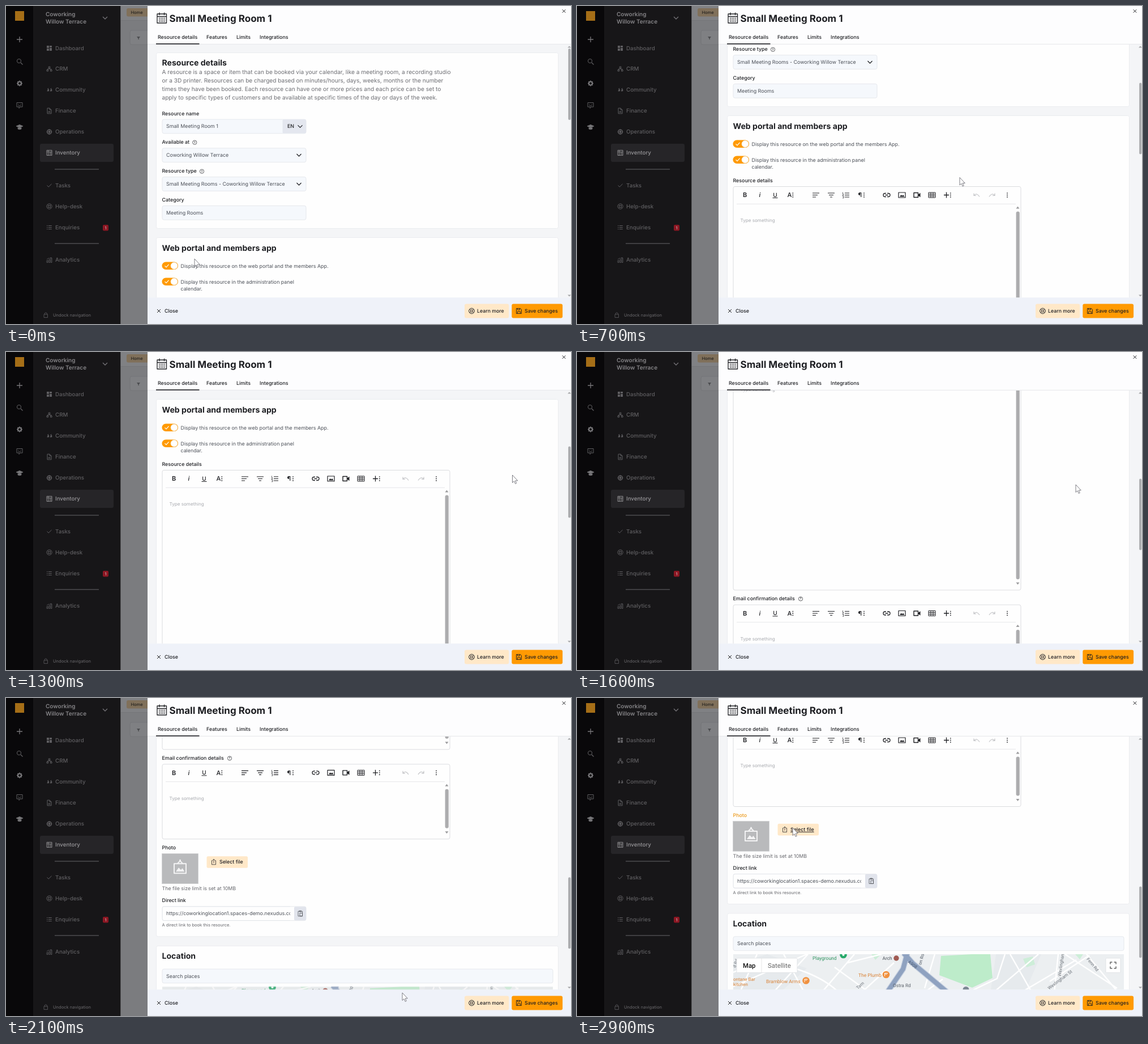
An HTML page for the animation above (3 s loop, 998 px wide and 561 px high).

```html
<!DOCTYPE html>
<html lang="en">
<head>
<meta charset="utf-8">
<title>Resource editor</title>
<style>
html, body { margin: 0; width: 100%; height: 100%; overflow: hidden; background: #fdfdfe; }
svg { display: block; width: 100vw; height: 100vh; font-family: Inter, sans-serif; font-optical-sizing: none; text-rendering: geometricPrecision; }
.map text { font-family: Roboto, sans-serif; }
</style>
</head>
<body>
<svg id="stage" viewBox="0 0 998 561"></svg>
<script>
const INK = '#1e1f23', SOFT = '#4c5058', DIM = '#5f5e61', AMBER = '#ff9a03', EDGE = '#e1e4e9';

const text = (x, y, s, size = 8.87, weight = 500, color = INK, extra = '') =>
  `<text x="${x}" y="${y}" dy=".355em" font-size="${size}" font-weight="${weight}" fill="${color}" ${extra}>${s}</text>`;
const heading = (y, s) => text(275.5, y, s, 14.1, 700);
const rect = (x, y, w, h, fill, r = 0, stroke = 'none', extra = '') =>
  `<rect x="${x}" y="${y}" width="${w}" height="${h}" rx="${r}" fill="${fill}" stroke="${stroke}" stroke-width=".8" ${extra}/>`;
const path = (d, stroke = INK, width = 1, fill = 'none', extra = '') =>
  `<path d="${d}" stroke="${stroke}" stroke-width="${width}" fill="${fill}" stroke-linejoin="round" ${extra}/>`;
const circle = (x, y, r, fill, stroke = 'none', width = 1) =>
  `<circle cx="${x}" cy="${y}" r="${r}" fill="${fill}" stroke="${stroke}" stroke-width="${width}"/>`;
const group = (x, y, body, extra = '') => `<g transform="translate(${x} ${y})" ${extra}>${body}</g>`;
const chevron = (x, y, color = INK, r = 4) => path(`M${x - r} ${y - r / 2}l${r} ${r} ${r} ${-r}`, color, 1.2);
const cross = (x, y, r) => path(`M${x - r} ${y - r}l${2 * r} ${2 * r}m0 ${-2 * r}l${-2 * r} ${2 * r}`);
const triangle = (x, y, h, color) => path(`M${x - 3} ${y + h}h6l-3 ${-2 * h}z`, 'none', 0, color);
const help = (x, y) => circle(x, y, 3.6, 'none', INK, .7) + text(x, y, '?', 5.5, 500, INK, 'text-anchor="middle"');
const buoy = (c, r = 4.6) => circle(0, 0, r, 'none', c) + circle(0, 0, 2, 'none', c) +
  path('M-3.2-3.2l1.8 1.8m2.8 2.8l1.8 1.8m0-6.4l-1.8 1.8m-2.8 2.8l-1.8 1.8', c);

function sidebar() {
  const icons = {
    Dashboard: rect(-4.5, -4.5, 4, 4, DIM) + rect(.5, -4.5, 4, 3, DIM) + rect(-4.5, .5, 4, 4, DIM) + rect(.5, -.5, 4, 5, DIM),
    CRM: path('M-1.3-4h2.6v2.4h-2.6zM-4.5 1.6h2.6V4h-2.6zM1.9 1.6h2.6V4H1.9zM0-1.6V0M-3.2 1.6V0h6.4v1.6', DIM),
    Community: path('M-3.9 2h3v-3h-2q0-1.6 1.6-2m2.6 5h3v-3h-2q0-1.6 1.6-2', DIM, .8, DIM),
    Finance: path('M-3.5-4.8h4l3 3v6.6h-7zM.5-4.8v3h3M-1.5 3V1M0 3v-2.6M1.5 3V1', DIM),
    Operations: circle(0, 0, 3.8, 'none', DIM, 1.5) + rect(-1.6, -1.6, 3.2, 3.2, DIM) + path('M0-5v10M-5 0h10', DIM, .7),
    Inventory: path('M-4.5-4.5h9v9h-9zM-4.5-1.8h9M-1.8-4.5v9M0 0h3.5M0 2.3h3.5', '#8c8b8d'),
    Tasks: path('M-4 0l2.7 2.7L4-2.6', DIM),
    'Help-desk': buoy(DIM),
    Enquiries: path('M-4.5-3h1.5M-4.5 0h1.5M-4.5 3h1.5M-1.7-3h6M-1.7 0h6M-1.7 3h6', DIM),
    Analytics: path('M-4.5 4.5V1h2v3.5zM-.8 4.5v-5h2v5zM2.7 4.5v-8h1.8v8zM-4.5-1l3-2 2 .4 3-2', DIM, .8)
  };
  const rows = [74.5, 111, 148, 185, 222, 259, 316.5, 353.5, 390.5, 448];
  let out = rect(0, 0, 48, 561, '#09080a') + rect(48, 0, 154.3, 561, '#171618') + rect(60, 243, 130, 32, '#262528', 3);
  Object.keys(icons).forEach((name, i) => {
    out += group(76.5, rows[i], icons[name]) + text(87, rows[i], name, 9.72, 500, i == 5 ? '#98979a' : DIM);
  });
  const rail = '#777679';
  return out + rect(16, 9, 16, 17, '#a56e17') +
    path('M24 54v10M19 59h10', rail, 1.3) +
    circle(23, 97, 3.6, 'none', DIM) + path('M26 100l3.5 3.5', DIM, 1.2) +
    circle(24, 136.5, 3, 'none', rail, 2.2) + path('M24 131.5v2m0 6v2m-5-5h2m6 0h2M20.5 133l1.3 1.3m4.4 4.4l1.3 1.3m0-7l-1.3 1.3m-4.4 4.4l-1.3 1.3', rail, 1.6) +
    path('M19 170.5h10v7.5h-4l-2 2.5V178h-4zM22 173v1m4-1v1M21.5 175.5q2.5 1.8 5 0', DIM) +
    path('M18 212l6-2.6 6 2.6-6 2.6zM21 214.5v2.5q3 1.5 6 0v-2.5', rail, .8, rail) +
    text(70, 14.5, 'Coworking', 10, 600, '#858487') + text(70, 27, 'Willow Terrace', 10, 600, '#858487') +
    chevron(175, 21, rail) + path('M86 288h78M86 419h78', '#67666a') +
    rect(171, 386, 10, 10.5, '#8c1723', 2) + text(176, 391.3, '1', 7, 500, '#c9b0b3', 'text-anchor="middle"') +
    path('M67 544h6.5v5.5h-6.5zM68.3 544v-2q2-2.5 4 0v2', DIM, .8) + text(83, 545.5, 'Undock navigation', 7.5, 500, DIM);
}

function backdrop() {
  return rect(202, 0, 48, 561, '#7b7c7f') + rect(202, 0, 48, 25, '#808184') + path('M203 25.5h47', '#747578') +
    rect(213, 4, 40, 14.5, '#80705a', 3) + text(220.5, 11, 'Home', 7.5, 500, '#242220') +
    rect(219, 43, 40, 25, '#7f8083', 3, '#727376') + path('M231 54h6l-2.3 3v2.5l-1.4-1v-1.5z', 'none', 0, '#4a4b4e');
}

function chrome() {
  return rect(250, 0, 748, 67, '#fdfdfe') + path('M250 67.3h748', '#e6e8eb') +
    path('M267 14h16.5v16H267zM267 18.5h16.5M271 11.5v4.5M279.5 11.5v4.5', INK, 1.3) +
    path('M270 21.5h11M270 24.3h11M270 27h11', INK, 1.3, 'none', 'stroke-dasharray="1.8 1.3"') +
    text(288.5, 21.5, 'Small Meeting Room 1', 17.05, 700) + cross(985.5, 9, 2.8) +
    [[268, 'Resource details'], [354, 'Features'], [407, 'Limits'], [448, 'Integrations']].map(([x, s]) => text(x, 55, s)).join('') +
    rect(265, 66, 76.5, 1.6, INK) +
    rect(250, 514.5, 748, 47, '#eff2f9') + cross(270, 538, 3) + text(280, 538, 'Close') +
    rect(810, 525.6, 78.3, 25, '#ffe8c8', 3) + group(822.5, 538, buoy(INK, 4.8)) + text(832, 538, 'Learn more', 8.75) +
    rect(893.3, 525.6, 89.8, 25, AMBER, 3) + path('M901.5 533.5h7l2 2v7h-9zM903.5 533.5v2.5h4v-2.5M903.5 542.5v-3.5h5v3.5', INK, .9) +
    text(916, 538, 'Save changes', 8.75) +
    triangle(995, 72, 1.4, '#a4a5a8') + triangle(995, 511, -1.4, '#a4a5a8') +
    rect(993.1, 75, 4.2, 126, '#abacaf', 2.1, 'none', 'id="thumb"');
}

const card = (y, h) => rect(265.5, y, 710, h, '#fefefe', 3, '#e7e9ec');
const field = (y, s, w = 254, fill = '#f5f8fc') => rect(276, y, w, 24.8, fill, 3, EDGE) + text(283, y + 12.3, s, 8.9, 400, SOFT);
const toggle = y => rect(275.5, y - 6.8, 28.5, 13.6, AMBER, 6.8) + circle(297, y, 6.1, '#fff', '#e8d3ae', .6) +
  path(`M280.5 ${y}l2.5 2.5 4.5-5`, '#fff', 1.2);

function editor(y, h) {
  const c = y + 15, pale = '#c3c4c7';
  const at = (x, body) => group(x, c, body);
  const dots = x => [-3.4, 0, 3.4].map(d => circle(x, c + d, .9, INK)).join('');
  const bars = widths => path(widths.map(([x, w], i) => `M${x} ${i * 3.5 - 3.5}h${w}`).join(''), INK, 1.2);
  return rect(276, y, 508, h, '#fefefe', 3, '#d3d5d9') + path(`M282 ${y + 30.8}h493`, '#e6e7e9') +
    text(293, c, 'B', 11, 600) + text(321.5, c, 'i', 11, 500, INK, 'font-style="italic"') +
    text(346.3, c - .5, 'U', 10, 500) + path(`M345.5 ${c + 5}h9`) +
    text(371.5, c, 'A', 11, 500) + dots(381.3) +
    at(421, bars([[-5, 12], [-5, 9], [-5, 6]])) + at(449, bars([[-6, 12], [-4, 8], [-2, 4]])) +
    at(475, bars([[-2, 8], [-2, 8], [-2, 8]]) + path('M-5.5-5v3M-6-1.5h2l-2 2.500h2M-6 2.5h2v2.8h-2', INK, .7)) +
    text(496.5, c, '¶', 11, 600) + dots(507) +
    at(547, path('M-1-3h-2a3 3 0 0 0 0 6h2M1-3h2a3 3 0 0 1 0 6h-2M-2.5 0h5', INK, 1.3)) +
    at(574, path('M-6-4.5h12v9h-12z', INK, 1.2) + path('M-4 3l2.5-3.5 2 2 1.5-2 2.5 3.5z', 'none', 0, INK)) +
    at(600, path('M-5-4h7.5v8h-7.5z', INK, 1.4) + path('M2.5-.8l4-3v7.6l-4-3z', 'none', 0, INK)) +
    at(627, path('M-6-4.5h12v9h-12zM-6-1.5h12M-6 1.5h12M-2-4.5v9M2-4.5v9')) +
    at(652.5, path('M0-5v10M-4.5 0h9', INK, 1.3)) + dots(659.8) +
    at(706, path('M-5-3v4h4M-5 1q5-6 10 2', pale, 1.2)) + at(733, path('M5-3v4h-4M5 1q-5-6-10 2', pale, 1.2)) + dots(760) +
    text(288.5, y + 60, 'Type something', 8.1, 400, '#a9abb0') +
    triangle(778.5, y + 37, 2, '#9c9c9e') + triangle(778.5, y + h - 11.5, -2, '#9c9c9e') +
    rect(775.6, y + 44, 6.2, h - 63, '#adadaf', 3);
}

function map() {
  const turned = (x, y, angle, s, color = '#6b7178', size = 7.8) =>
    group(x, y, text(0, 0, s, size, 400, color, `transform="rotate(${angle})" text-anchor="middle"`));
  const pin = (x, y, c) => circle(x, y, 6.3, c) + path(`M${x - 2.5} ${y - 2.5}h5l-2.5 2.7zv5.5`, '#fff', .9);
  const orange = '#d98236', mainRoads = 'M584 448L576 478 546 522M577 450L593 468 660 524';
  return rect(276, 452, 690, 70, '#eceff1') +
    path('M276 470l60-18 70 25-50 45H276zM740 452h80l-30 70h-60z', 'none', 0, '#e6eaed') +
    path('M643 455l55-3h32l4 42-36 17-58-22z', 'none', 0, '#bdecca') +
    path('M788 460l17-4 4 14-15 5zM880 452h14l-6 9zM520 452h17l-10 10z', 'none', 0, '#cdeed8') +
    path('M276 484q50-24 105-8t84 46M318 452l-28 62M365 452l38 70M408 452l-60 66M276 509l130-57M430 522l60-70M455 475l55 40M478 467l60-15M500 522l60-55M610 522l36-26M632 452l-18 60M700 515l42-20 14-43M735 520l80-68M765 452l40 70M780 522l102-60M850 452l-7 68M862 452l92 60M900 452l58 70M835 500l70-46', '#fff', 2.4) +
    path(mainRoads, '#c5cfdf', 10.5) + path(mainRoads, '#8fa2c0', 8) +
    turned(593, 470, 38, 'A908', '#46566e') + turned(608, 461, -75, 'on Rd', '#4d5662') +
    turned(280, 468, -72, 'd Rd') + turned(500, 507, -42, 'Tarn') +
    turned(855, 470, -82, 'Wexlingham') + turned(853, 497, -37, 'Wexlingham St') + turned(911, 470, 50, 'Fenn Rd') +
    text(416, 458.5, 'Playground', 8.5, 400, '#2f9460') + circle(470.5, 453, 6.3, '#28a96b') + circle(470.5, 453, 2, '#fff') +
    text(539.5, 459, 'Arch', 8.3, 400, '#4a5058') + circle(564, 459, 4.7, '#a05a52') +
    text(497, 489, 'The Plumb', 8.5, 400, orange) + pin(546, 488, '#f0913f') +
    text(334, 499.5, 'Bramblow Arms', 8.5, 400, orange) + pin(404.5, 498.5, '#f0913f') +
    text(276, 496.5, 'ontane Bar', 8, 400, orange) + text(276, 505.5, 'kitchen', 8, 400, orange) +
    text(558, 507, 'Ostra Rd', 8.3, 400, '#5c636b') + circle(687, 514.5, 5.5, '#7c8793') +
    rect(276, 452, 690, 70, '#d6d6d6', 0, 'none', 'id="veil" opacity=".22"') +
    `<g id="controls">${rect(282, 459, 107, 25.5, '#fff', 1.5, '#dcdfe2') + path('M326 459v25.5', '#e6e6e6') +
      text(293, 471.5, 'Map', 11.3, 500, '#111') + text(337, 471.5, 'Satellite', 11.4, 400, '#666') +
      rect(934, 459, 26, 25.5, '#fff', 1.5, '#dcdfe2') +
      path('M942 469.5v-3.5h3.5M948.5 466h3.5v3.5M952 473.5v3.5h-3.5M945.5 477h-3.5v-3.5', '#666', 1.5)}</g>`;
}

function page() {
  const about = ['A resource is a space or item that can be booked via your calendar, like a meeting room, a recording studio',
    'or a 3D printer. Resources can be charged based on minutes/hours, days, weeks, months or the number',
    'times they have been booked. Each resource can have one or more prices and each price can be set to',
    'apply to specific types of customers and be available at specific times of the day or days of the week.'];
  return card(82.5, 310) + heading(100, 'Resource details') +
    about.map((s, i) => text(275.5, 116 + i * 15.25, s, 10.12, 400, '#6d6e73')).join('') +
    text(275.5, 189.5, 'Resource name') + field(200, 'Small Meeting Room 1') +
    rect(488.5, 200.3, 41.5, 24.2, '#e4e7ef', 2) + text(497, 212.3, 'EN') + chevron(519.5, 212.3) +
    text(275.5, 240.3, 'Available at') + help(333.3, 240.7) + field(250.8, 'Coworking Willow Terrace') + chevron(517.5, 263) +
    text(275.5, 291.3, 'Resource type') + help(346, 291.7) + field(301.6, 'Small Meeting Rooms - Coworking Willow Terrace') + chevron(517.5, 314) +
    text(275.5, 342, 'Category') + field(352.4, 'Meeting Rooms') +

    card(408.5, 869) + heading(426.5, 'Web portal and members app') +
    toggle(458.3) + text(308.5, 458.5, 'Display this resource on the web portal and the members App.', 8.87, 400, SOFT) +
    toggle(486.2) + text(308.5, 486.5, 'Display this resource in the administration panel', 8.87, 400, SOFT) +
    text(308.5, 499, 'calendar.', 8.87, 400, SOFT) +
    text(275.5, 522.8, 'Resource details') + editor(533.5, 414) +
    text(275.5, 962.3, 'Email confirmation details') + help(395, 963) + editor(973.5, 132) +
    text(275.5, 1121, 'Photo', 8.87, 500, INK, 'id="photo"') + rect(275.5, 1131.3, 64, 53, '#b9babc', 0, '#cfd0d2') +
    path('M297 1149h21v17h-21zM302.5 1149l5-5 5 5', '#f3f3f4', 2) + path('M300 1163l5-7 4 4 2.5-3 4 6z', 'none', 0, '#f3f3f4') +
    circle(307.5, 1143, 1.5, '#f3f3f4') +
    rect(354.5, 1135.8, 72.5, 20.6, '#ffe8c8', 2.5) + path('M365 1143.5h-1.5v7h7v-7H369M367 1148v-7m-2 2l2-2 2 2', INK, .75) +
    text(377, 1146, 'Select file', 8.8, 500, INK, 'id="select"') +
    text(275.5, 1192.5, 'The file size limit is set at 10MB', 8.87, 400, '#66676c') +
    text(275.5, 1214, 'Direct link') +
    `<g clip-path="url(#link)">${field(1224.5, 'https://coworkinglocation1.spaces-demo.nexudus.com', 254, '#fefefe')}</g>` +
    rect(276, 1224.5, 254, 24.8, 'none', 3, EDGE) + rect(509, 1224.8, 21, 24.2, '#e1e4ec', 2) +
    path('M516 1233h7.5v8.5h-7.5zM518 1232h3.5v1.5h-3.5zM519 1236h4.5v5.5h-4.500z', '#4a4c52', .75) +
    text(275.5, 1257.3, 'A direct link to book this resource.', 7.5, 400, '#66676c') +

    card(1294, 400) + heading(1311.5, 'Location') + field(1334.8, 'Search places', 690) +
    group(0, 914, map(), 'class="map" clip-path="url(#mapBox)"');
}

const stage = document.getElementById('stage');
stage.innerHTML = `<defs><clipPath id="view">${rect(250, 68, 748, 446.5, '#000')}</clipPath>
  <clipPath id="link">${rect(276, 1224, 226, 26, '#000')}</clipPath>
  <clipPath id="mapBox">${rect(276, 452, 690, 200, '#000')}</clipPath></defs>` +
  backdrop() + sidebar() + rect(250, 0, 748, 561, '#f4f5f7') +
  `<g clip-path="url(#view)"><g id="page">${page()}</g></g>` + chrome() +
  `<g id="cursor"><g id="arrow">${path('M0 0v13.5l3-2.7 2.2 4.7 2-1-2.1-4.5h4.2z', '#5d5e66', .8, '#fff')}</g>
  <g id="hand">${path('M-1.5 9V1q1.5-2 3 0v4.5q1.5-1.5 2.5.3 1.7-1 2.3.6 1.7-.6 1.7 1.4 0 5-2.5 8.7h-5.500Q-2 14-4.5 10.5q1-2 3-.5', '#5d5e66', .8, '#fff')}</g></g>`;

const scrollKeys = [[0, 0], [400, 0], [500, 37], [600, 139], [700, 215], [800, 262], [900, 282], [1200, 322], [1300, 325],
  [1400, 340], [1800, 715], [1900, 770], [2200, 900], [2300, 914]];
const cursorKeys = [[0, 333, 446], [400, 674, 306], [500, 677, 302], [900, 675, 303], [1200, 885, 220], [1300, 894.5, 217],
  [1900, 867.5, 251], [2100, 700, 520], [2400, 395.5, 240], [2600, 381, 229]];

function sample(keys, t) {
  const i = keys.findIndex(k => k[0] > t);
  if (i < 0) return keys[keys.length - 1].slice(1);
  const a = keys[i - 1], b = keys[i], f = (t - a[0]) / (b[0] - a[0]);
  return a.slice(1).map((v, n) => v + (b[n + 1] - v) * f);
}

const el = id => document.getElementById(id);
const show = (id, on) => el(id).setAttribute('visibility', on ? 'visible' : 'hidden');

function draw(now) {
  const t = Math.floor(now % 3000 / 100) * 100;   // ten pictures a second
  const [scroll] = sample(scrollKeys, t), [x, y] = sample(cursorKeys, t);
  const hand = t >= 2400 && t < 2600, mapReady = t >= 2500;
  el('page').setAttribute('transform', `translate(0 ${-scroll})`);
  el('thumb').setAttribute('y', 75 + scroll / 3.55);
  el('cursor').setAttribute('transform', `translate(${x} ${y})`);
  show('hand', hand);
  show('arrow', !hand);
  show('controls', mapReady);
  show('veil', !mapReady);
  el('photo').setAttribute('fill', t >= 2600 ? '#ec9a1c' : INK);
  el('select').setAttribute('text-decoration', t >= 2500 ? 'underline' : 'none');
  requestAnimationFrame(draw);
}
requestAnimationFrame(draw);
</script>
</body>
</html>
```
